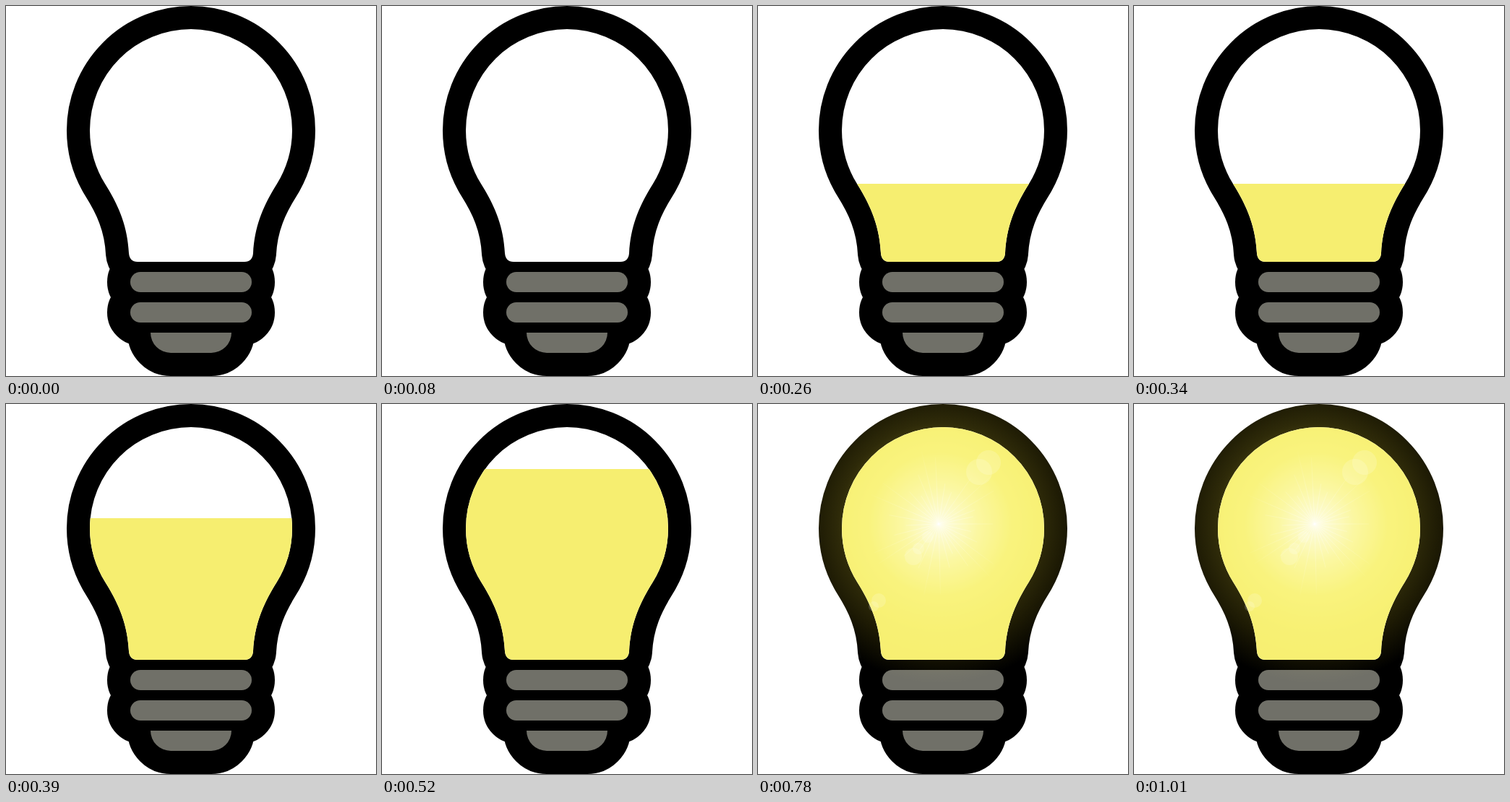
An HTML page that plays this animation: 512 by 512 pixels, repeating every 1.17 s.

```html
<!DOCTYPE html>
<html lang="en">
<head>
<meta charset="utf-8">
<title>Light bulb</title>
<style>
  html, body { margin: 0; height: 100%; overflow: hidden; background: #fff; }
  svg { display: block; width: 100vw; height: 100vh; }
  #glow { mix-blend-mode: screen; }
</style>
</head>
<body>
<svg viewBox="0 0 512 512">
  <defs>
    <path id="glass" d="M256 32A140 140 0 0 1 396 172C396 200 388 225 375 246C358 273 344 302 342 342Q341 354 330 354H182Q171 354 170 342C168 302 154 273 137 246C124 225 116 200 116 172A140 140 0 0 1 256 32Z"/>
    <g id="base">
      <rect x="172" y="368" width="168" height="28" rx="14"/>
      <rect x="172" y="410" width="168" height="28" rx="14"/>
      <path d="M200 452H312A28 28 0 0 1 284 480H228A28 28 0 0 1 200 452Z"/>
    </g>
    <clipPath id="inside"><use href="#glass"/></clipPath>
    <radialGradient id="light" gradientUnits="userSpaceOnUse" cx="252" cy="166" r="220">
      <stop offset="0" stop-color="#dcdccf"/>
      <stop offset=".09" stop-color="#b8b8a0"/>
      <stop offset=".24" stop-color="#8c8858"/>
      <stop offset=".45" stop-color="#544e18"/>
      <stop offset=".64" stop-color="#2e2a09"/>
      <stop offset=".78" stop-color="#1d1a04"/>
      <stop offset="1" stop-color="#000"/>
    </radialGradient>
    <radialGradient id="ray" gradientUnits="userSpaceOnUse" cx="250" cy="166" r="110">
      <stop offset="0" stop-color="#fff" stop-opacity=".35"/>
      <stop offset="1" stop-color="#fff" stop-opacity="0"/>
    </radialGradient>
  </defs>
  <g stroke="#000" stroke-width="64" stroke-linejoin="round">
    <use href="#glass"/><use href="#base"/>
  </g>
  <use href="#glass" fill="#fff"/>
  <use href="#base" fill="#707068"/>
  <rect id="fill" x="84" width="344" height="354" fill="#f6ee70" clip-path="url(#inside)"/>
  <g id="glow">
    <circle cx="252" cy="166" r="220" fill="url(#light)"/>
    <path id="rays" stroke="url(#ray)" fill="none"/>
    <g id="flares" fill="#fff" fill-opacity=".17"></g>
  </g>
</svg>
<script>
  const $ = id => document.getElementById(id);
  const levels = [354, 289, 246, 158, 90, 32];
  const STEP = 130, LOOP = 1170;

  let d = '';
  for (let i = 0; i < 32; i++) {
    const a = i * Math.PI / 16 + 0.05 * Math.sin(i * 7);
    const r = 75 + 30 * Math.sin(i * 5);
    d += `M250 166l${r * Math.cos(a)} ${r * Math.sin(a)}`;
  }
  $('rays').setAttribute('d', d);

  const flares = [[319, 81, 17], [306, 94, 18], [235, 184, 8], [222, 200, 8],
                  [215, 211, 12], [167, 272, 10], [160, 280, 7]];
  $('flares').innerHTML = flares.map(([x, y, r]) =>
    `<circle cx="${x}" cy="${y}" r="${r}"/>`).join('');

  function draw(now) {
    const step = Math.floor(now % LOOP / STEP);
    const y = levels[Math.min(step, 5)];
    $('fill').setAttribute('y', y);
    $('glow').style.display = step > 5 ? '' : 'none';
    requestAnimationFrame(draw);
  }
  draw(0);
</script>
</body>
</html>
```
